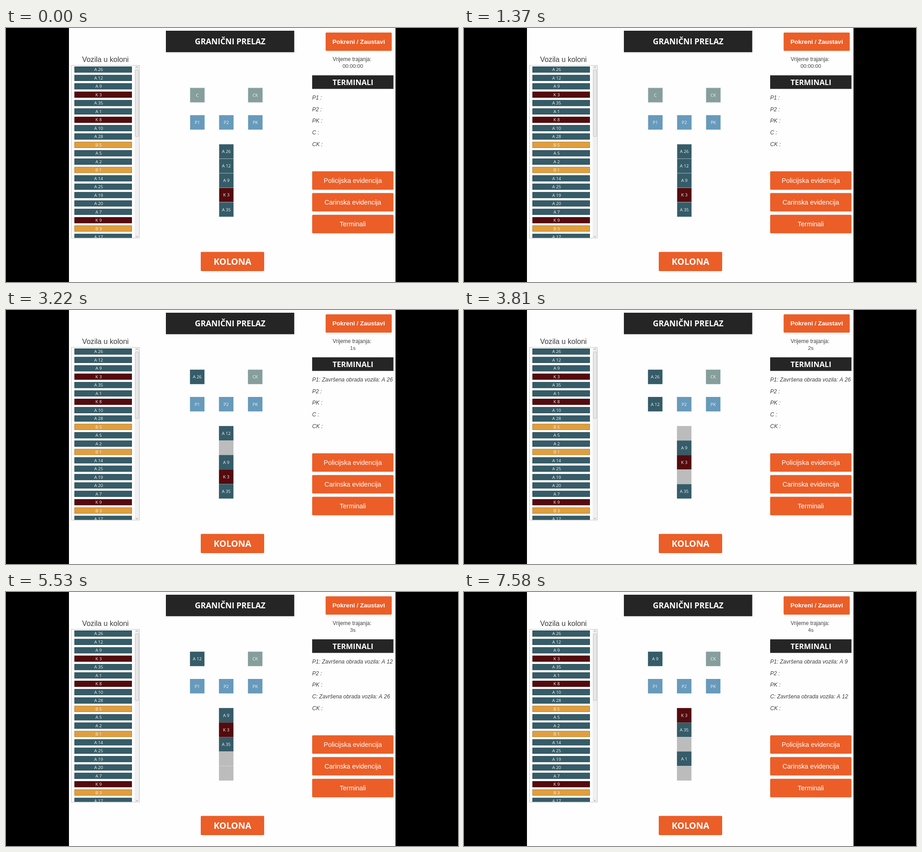
Recreate the animation shown at these times as an HTML page with a canvas. Size 998 px wide and 561 px high, loop 8000 ms.

```html
<!DOCTYPE html>
<html lang="bs">
<head>
<meta charset="utf-8">
<title>Granični prelaz</title>
<style>
  html, body { margin: 0; width: 100%; height: 100%; overflow: hidden; background: #000; }
  canvas { display: block; width: 998px; height: 561px; }
</style>
</head>
<body>
<canvas id="stage" width="998" height="561"></canvas>
<script>
const ctx = document.getElementById('stage').getContext('2d');
const LOOP = 8000;
const SANS = '"Liberation Sans", Arial, sans-serif';
const HUMAN = '"Open Sans", "Noto Sans", sans-serif';
const ORANGE = '#eb5e28', INK = '#252525', GREY = '#bcbcbc';
const VEHICLE = { A: '#355c68', K: '#540b0e', B: '#e09f3e' };
const POLICE = '#679abb', CUSTOMS = '#869f9c';

const column = ['A 26', 'A 12', 'A 9', 'K 3', 'A 35', 'A 1', 'K 8', 'A 10', 'A 28', 'B 5', 'A 5',
  'A 2', 'B 1', 'A 14', 'A 25', 'A 19', 'A 20', 'A 7', 'K 9', 'B 3', 'A 17'];

const busy = v => ': Obrađuje vozilo: ' + v;
const done = v => ': Završena obrada vozila: ' + v;

const initial = {
  running: false, clock: '00:00:00',
  queue: ['A 26', 'A 12', 'A 9', 'K 3', 'A 35'],
  p1: '', c: '', p1Note: ' :', cNote: ' :'
};

// Simulation events: time in ms and the state they set.
const events = [
  [1700, { running: true, clock: '0s' }],
  [1770, { p1: 'A 26', queue: ['', 'A 12', 'A 9', 'K 3', 'A 35'] }],
  [2690, { clock: '1s', p1Note: done('A 26') }],
  [3020, { p1: '', c: 'A 26', queue: ['A 12', '', 'A 9', 'K 3', 'A 35'] }],
  [3350, { clock: '2s', queue: ['A 12', 'A 9', '', 'K 3', 'A 35'] }],
  [3610, { p1: 'A 12', queue: ['', 'A 9', 'K 3', '', 'A 35'] }],
  [4140, { cNote: busy('A 26'), queue: ['A 9', '', 'K 3', 'A 35', ''] }],
  [4730, { clock: '3s', p1Note: busy('A 12'), queue: ['A 9', 'K 3', '', 'A 35', ''] }],
  [5130, { p1Note: done('A 12'), cNote: done('A 26'), queue: ['A 9', 'K 3', 'A 35', '', ''] }],
  [5530, { p1: '', c: 'A 12' }],
  [6120, { p1: 'A 9', queue: ['', 'K 3', 'A 35', '', 'A 1'] }],
  [6850, { cNote: busy('A 12') }],
  [7580, { clock: '4s', p1: '', c: 'A 9', p1Note: done('A 9'), cNote: done('A 12'),
           queue: ['K 3', 'A 35', '', 'A 1', ''] }]
];

function stateAt(t) {
  const s = { ...initial };
  for (const [at, change] of events) if (t >= at) Object.assign(s, change);
  return s;
}

function box(x, y, w, h, color, r = 0) {
  ctx.fillStyle = color;
  ctx.beginPath();
  ctx.roundRect(x, y, w, h, r);
  ctx.fill();
}

function text(str, x, y, font, color = '#fff', align = 'center') {
  ctx.font = font;
  ctx.fillStyle = color;
  ctx.textAlign = align;
  ctx.fillText(str, x, y);
}

function button(str, x, y, w, h, font, drop) {
  box(x, y, w, h, ORANGE, 2);
  text(str, x + w / 2, y + h / 2 + drop, font);
}

function cell(str, x, y, color, lined) {
  box(x, y, 32, 32, color);
  if (lined) {
    ctx.strokeStyle = 'rgba(190,205,210,.55)';
    ctx.lineWidth = 1;
    ctx.strokeRect(x, y, 32, 32);
  }
  text(str, x + 16, y + 19.6, '9.6px ' + HUMAN, '#f1f5f5');
}

function arrow(x, y, dir) {
  ctx.strokeStyle = '#8c8c8c';
  ctx.lineWidth = 1;
  ctx.beginPath();
  ctx.moveTo(x - 2.5, y + dir);
  ctx.lineTo(x, y - dir);
  ctx.lineTo(x + 2.5, y + dir);
  ctx.stroke();
}

function drawList() {
  text('Vozila u koloni', 219.5, 75, '16.1px ' + SANS, '#3c3c3c');
  ctx.save();
  ctx.beginPath();
  ctx.rect(145, 83, 149, 381);
  ctx.clip();
  column.forEach((v, i) => {
    const y = 85 + i * 18.48;
    box(151, y, 127, 13.6, VEHICLE[v[0]]);
    ctx.strokeStyle = 'rgba(0,0,0,.22)';
    ctx.lineWidth = 1;
    ctx.strokeRect(151.5, y + .5, 126, 12.6);
    text(v, 204.5, y + 10.4, '9.6px ' + HUMAN, '#f3f3f0');
  });
  box(284, 83, 10, 381, '#f0f0f0');
  box(285, 92, 8.5, 148, '#c4c4c4', 2);
  box(286, 93, 6.5, 146, '#e7e7e7', 1);
  arrow(289, 86.5, 1.2);
  arrow(289, 460.5, -1.2);
  ctx.restore();
  ctx.strokeStyle = '#c5c5c5';
  ctx.lineWidth = 1;
  ctx.strokeRect(144.5, 82.5, 150, 381.5);
}

function drawCrossing(s) {
  const lined = !s.running;
  const dx = lined ? .5 : .2, dy = lined ? .5 : 0;
  const post = (label, v, x, y, color) =>
    cell(v || label, x + dx, y + dy, v ? VEHICLE[v[0]] : color, lined);
  post('C', s.c, 406, 131.7, CUSTOMS);
  post('CK', '', 534, 131.7, CUSTOMS);
  post('P1', s.p1, 406, 192, POLICE);
  post('P2', '', 470, 192, POLICE);
  post('PK', '', 534, 192, POLICE);
  s.queue.forEach((v, i) => post('', v, 470, 256.2 + i * 32.05, GREY));
}

function drawPanel(s) {
  button('Pokreni / Zaustavi', 705.7, s.running ? 9.5 : 10, 146, 40.5, 'bold 13.55px ' + SANS, 4.5);
  text('Vrijeme trajanja:', 764, 73, '11.9px ' + SANS, '#444');
  text(s.clock, 765.7, 88, '11.7px ' + SANS, '#444');

  box(676, 104.5, 179.5, 30, INK);
  text('TERMINALI', 766, 126, 'bold 16.45px ' + HUMAN);
  ['P1' + s.p1Note, 'P2 :', 'PK :', 'C' + s.cNote, 'CK :'].forEach((line, i) =>
    text(line, 676, 158 + i * 25.7, 'italic 12.04px ' + SANS, '#3f3f3f', 'left'));

  ['Policijska evidencija', 'Carinska evidencija', 'Terminali'].forEach((label, i) =>
    button(label, 676, 316.4 + i * 48.1, 179.5, 40.8, '14.45px ' + SANS, 5));
}

function draw(t) {
  const s = stateAt(t);
  box(0, 0, 998, 561, '#000');
  box(139, 0, 721, 561, '#fefefe');
  box(353, 6, 283.5, 47.5, INK);
  text('GRANIČNI PRELAZ', 495, 36, 'bold 17.45px ' + HUMAN);
  drawList();
  drawCrossing(s);
  drawPanel(s);
  button('KOLONA', 430, 494.5, 140, 42.5, 'bold 19.4px ' + HUMAN, 6.8);
}

const start = performance.now();
function tick() {
  draw((performance.now() - start) % LOOP);
  requestAnimationFrame(tick);
}
tick();
</script>
</body>
</html>
```
